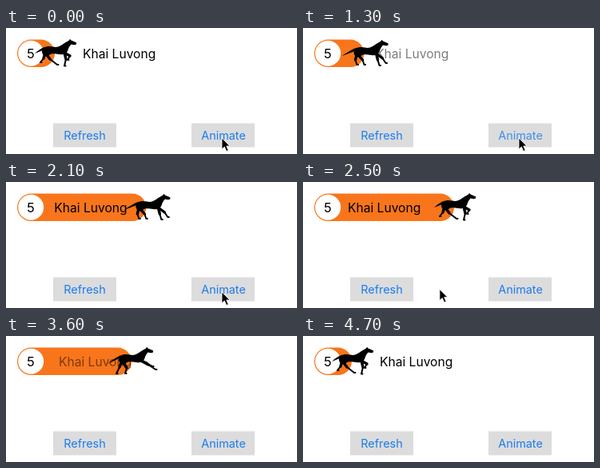
Write an HTML page that moves like this. It is 364 px wide and 158 px high and loops after 4.9 s.

```html
<!DOCTYPE html>
<html lang="en">
<head>
<meta charset="utf-8">
<title>Horse badge</title>
<style>
  html, body { margin: 0; width: 100%; height: 100%; overflow: hidden; background: #fff; }
  svg { display: block; width: 364px; height: 158px; font: 15.6px Inter, sans-serif; }
  .button { font-size: 14.4px; text-anchor: middle; fill: #1a7cf0; }
  .leg { fill: none; stroke: #000; stroke-linecap: round; stroke-linejoin: round; }
</style>
</head>
<body>
<svg viewBox="0 0 364 158">
  <clipPath id="inside"><rect id="clip" x="14" y="14" height="36"/></clipPath>
  <rect id="pill" x="14" y="14.6" height="34.4" rx="17.2" fill="#f8751b"/>
  <circle cx="31.2" cy="31.8" r="16" fill="#fff"/>
  <text x="31" y="38" font-size="16.5" text-anchor="middle">5</text>
  <g id="label"><text id="name" y="38">Khai Luvong</text></g>
  <g id="horse">
    <path d="M10 29C11 23 18 22 24 23.5C30 25 34 22 38 19L44 15.5L45 13.8L46.5 15.5L53 18.2L53 20.5L50.5 21.2L46.5 20.5C44 23 43 26 42 29C40 33 36 34 32 33C27 33 23 31 19 34C15 37 10 35 10 29Z"/>
    <path id="tail"/>
    <path id="upper" class="leg" stroke-width="3.4"/>
    <path id="lower" class="leg" stroke-width="2"/>
  </g>
  <path d="M59 119.6h79v30h-79zM232 119.6h79v30h-79z" fill="#dcdcdc"/>
  <text id="refresh" class="button" x="98.5" y="140">Refresh</text>
  <text id="animate" class="button" x="272" y="140">Animate</text>
  <path id="cursor" d="M0 0V14L3.3 11L5.8 16.5L8.2 15.5L5.8 10H10Z" stroke="#fff" stroke-width=".8"/>
</svg>
<script>
const LOOP = 4900, RUN = 1380, OPEN = 1000, CLOSE = 3150, STRIDE = 108;
const $ = id => document.getElementById(id);
const set = (id, attrs) => {
  for (const key in attrs) $(id).setAttribute(key, attrs[key]);
};
const clamp = v => Math.max(0, Math.min(1, v));
const smooth = v => { v = clamp(v); return v * v * (3 - 2 * v); };

// Each leg: joint x, y, hoof x, y; the first two legs are the hind ones.
const poses = [
  { tail: [1, 32], legs: [[12, 38, 8, 43], [20, 39, 29, 46], [40, 39, 38, 47.5], [45, 35, 42, 40]] },
  { tail: [-4, 35], legs: [[11, 39, 7, 47], [20, 40, 18, 47], [47, 36, 56, 42], [45, 34, 52, 38]] },
  { tail: [-8, 31], dy: 2, legs: [[13, 37, 12, 42], [20, 38, 22, 45], [40, 38, 36, 44], [44, 38, 41, 46]] },
  { tail: [-5, 34], dx: 3, dy: 1, legs: [[12, 39, 14, 45], [21, 39, 23, 45], [40, 39, 42, 46], [46, 37, 50, 43]] }
];

function drawHorse(x, { tail, legs, dx = 0, dy = 0 }) {
  set('horse', { transform: `translate(${x + dx} ${dy})` });
  set('tail', { d: `M14 23.5Q7 26 ${tail}Q6 30 11 28Z` });
  set('upper', { d: legs.map(([x, y], i) => `M${i < 2 ? 14 : 38} 31L${x} ${y}`).join('') });
  set('lower', { d: legs.map(([x, y, hx, hy]) => `M${x} ${y}L${hx} ${hy}h1.5`).join('') });
}

// A pressed button dims at once and fades back.
function drawButton(id, t, press) {
  const dim = t < press ? 0 : 1 - clamp((t - press - 100) / 400);
  set(id, { 'fill-opacity': 1 - 0.75 * dim });
}

function draw(t) {
  const closing = t >= CLOSE;
  const elapsed = t - (closing ? CLOSE : OPEN);
  const eased = smooth(elapsed / RUN);
  const open = closing ? 1 - eased : eased;
  const running = elapsed > 0 && elapsed < RUN;
  const width = 47 + 128 * open;

  set('pill', { width });
  set('clip', { width });
  drawHorse(35 + 128 * open, poses[running ? Math.ceil(elapsed / STRIDE) % 4 : 0]);

  // The name fades out beside the badge and in again inside the pill.
  const [mid, inner, outer] = closing ? [0.5, 0.5, 0.3] : [0.25, 0.35, 0.25];
  const inside = open > mid;
  set('name', {
    x: 96 - 40 * open,
    'fill-opacity': clamp(inside ? (open - mid) / inner : (mid - open) / outer)
  });
  set('label', { 'clip-path': inside ? 'url(#inside)' : 'none' });

  drawButton('animate', t, 900);
  drawButton('refresh', t, 3000);

  const move = smooth((t - 2250) / 450);
  set('cursor', {
    transform: `translate(${270 - 170 * move} ${138 - 6 * move})`,
    visibility: t < 3400 ? 'visible' : 'hidden'
  });
}

const start = performance.now();
function frame() {
  const t = (performance.now() - start) % LOOP;
  draw(Math.floor(t / 100) * 100);
  requestAnimationFrame(frame);
}
frame();
</script>
</body>
</html>
```
